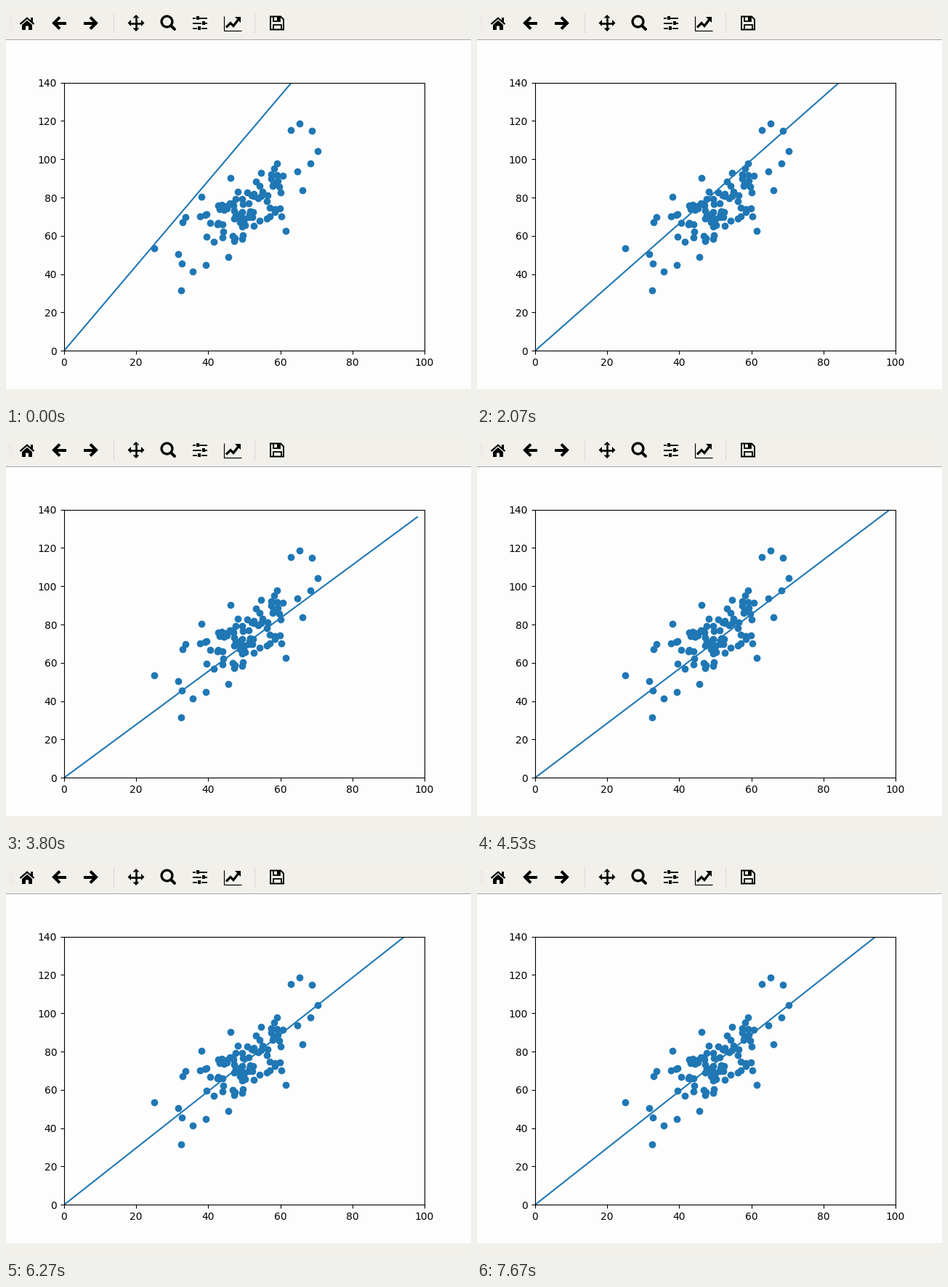
Write a matplotlib script that moves like this. It is 640 by 550 pixels and loops after 7740 ms.

```python
import numpy as np
import matplotlib.pyplot as plt
from matplotlib.animation import FuncAnimation
from matplotlib.patches import Circle, Polygon, Rectangle

W, H, DPI = 640, 550, 100
LOOP, STEP = 7740, 60
BLUE, PANEL, PAPER = "#1f77b4", "#f2f0eb", "#fdfdfe"

# samples on the rim of the cloud
RIM = [(25.1, 53.5), (31.6, 50.4), (32.5, 31.7), (32.7, 45.6), (32.9, 67.2),
       (33.6, 69.9), (35.6, 41.4), (38.1, 80.2), (39.3, 44.9), (45.6, 48.8),
       (46.2, 90.1), (60.3, 70.3), (61.5, 62.6), (63, 115.2), (64.7, 93.6),
       (65.4, 118.6), (66.2, 83.9), (68.3, 97.9), (68.8, 114.9),
       (70.3, 104.3)]

fig = plt.figure(figsize=(W / DPI, H / DPI), dpi=DPI, facecolor=PAPER)
ui = fig.add_axes([0, 0, 1, 1], zorder=-1)
ui.set(xlim=(0, W), ylim=(H, 0))
ui.axis("off")


def box(x, y, w, h, color="black"):
    ui.add_patch(Rectangle((x, y), w, h, fc=color, lw=0))


def fill(*pts):
    ui.add_patch(Polygon(pts, fc="black", lw=0))


def stroke(width, *pts, cap="butt"):
    xs, ys = zip(*pts)
    ui.plot(xs, ys, color="black", lw=width * 0.72, solid_capstyle=cap,
            solid_joinstyle="miter")


def home(x, y):
    stroke(2.2, (x - 9.5, y + 1.5), (x, y - 6.8), (x + 9.5, y + 1.5))
    box(x + 4.5, y - 8, 3, 6)
    fill((x - 7, y + 2.5), (x, y - 3.5), (x + 7, y + 2.5), (x + 7, y + 9.5),
         (x + 2, y + 9.5), (x + 2, y + 4), (x - 2, y + 4), (x - 2, y + 9.5),
         (x - 7, y + 9.5))


def arrow(x, y, d):
    stroke(4, (x - 10 * d, y), (x + 8 * d, y))
    stroke(4, (x - d, y - 8), (x + 7 * d, y), (x - d, y + 8))


def pan(x, y):
    for dx, dy in ((1, 0), (-1, 0), (0, 1), (0, -1)):
        stroke(2.6, (x, y), (x + 8 * dx, y + 8 * dy))
        bx, by = x + 7 * dx, y + 7 * dy
        fill((x + 11.5 * dx, y + 11.5 * dy), (bx + 4.5 * dy, by + 4.5 * dx),
             (bx - 4.5 * dy, by - 4.5 * dx))


def zoom(x, y):
    ui.add_patch(Circle((x - 1.5, y - 2), 7.4, fill=False, lw=3.3 * 0.72))
    stroke(4, (x + 4.5, y + 4), (x + 9, y + 8.5), cap="round")


def sliders(x, y):
    for dy, knob in ((-7, -3.5), (0, 4.5), (7, -1)):
        stroke(1.8, (x - 10, y + dy), (x + knob - 2.6, y + dy))
        stroke(1.8, (x + knob + 2.6, y + dy), (x + 10, y + dy))
        box(x + knob - 2, y + dy - 2.5, 4, 5)


def chart(x, y):
    stroke(1.2, (x - 11.5, y - 10), (x - 11.5, y + 10), (x + 13, y + 10))
    stroke(3.2, (x - 8, y + 6), (x - 2, y), (x + 2, y + 4), (x + 8.5, y - 4.5))
    fill((x + 4, y - 8.5), (x + 11.5, y - 8.5), (x + 11.5, y - 1))


def disk(x, y):
    stroke(2, (x - 9, y), (x - 9, y - 9), (x + 5, y - 9), (x + 9, y - 5),
           (x + 9, y + 9), (x - 9, y + 9), (x - 9, y))
    stroke(1.8, (x - 5, y - 9), (x - 5, y - 3), (x + 4, y - 3), (x + 4, y - 9))
    box(x, y - 9, 3, 5)
    stroke(1.8, (x - 5.5, y + 9), (x - 5.5, y + 2.5), (x + 5.5, y + 2.5),
           (x + 5.5, y + 9))


def toolbar():
    box(0, 0, W, 46, PANEL)
    box(0, 46, W, 1, "#a8a8a8")
    box(0, 528, W, H - 528, PANEL)
    for x in (148, 342):
        box(x, 10, 1, 28, "#d8d8d8")
    for y in range(15, 32, 4):
        box(5, y, 1, 1, "#c4c4c4")
        box(8, y + 2, 1, 1, "#c4c4c4")
    home(29, 23.5)
    arrow(73, 23.5, -1)
    arrow(117, 23.5, 1)
    pan(179, 23.5)
    zoom(223, 23.5)
    sliders(267, 23.5)
    chart(311, 23.5)
    disk(373, 23.5)


def cloud(n=80):
    """Random samples in a band along the trend, plus the rim."""
    rng = np.random.default_rng(4)
    x = rng.triangular(33, 51, 63, n)
    y = 73 + 1.3 * (x - 50) + rng.uniform(-14, 14, n)
    return np.vstack([RIM, np.column_stack([x, y])])


def slope(t):
    """Hold the first guess, then swing into the best fit."""
    s = max(t - 1010, 0)
    return 1.476 + 0.743 * np.exp(-s / 1350) * np.cos(np.pi * s / 3200)


toolbar()
ax = fig.add_axes([80 / W, 74.8 / H, 496 / W, 369.6 / H], facecolor=PAPER)
ax.set(xlim=(0, 100), ylim=(0, 140))
ax.scatter(*cloud().T, color=BLUE)
line, = ax.plot([], [], color=BLUE, lw=1.5)


def update(i):
    line.set_data([0, 98], [0, 98 * slope(i * STEP)])
    return line,


anim = FuncAnimation(fig, update, frames=LOOP // STEP, interval=STEP,
                     repeat=True, repeat_delay=0)
plt.show()
```
